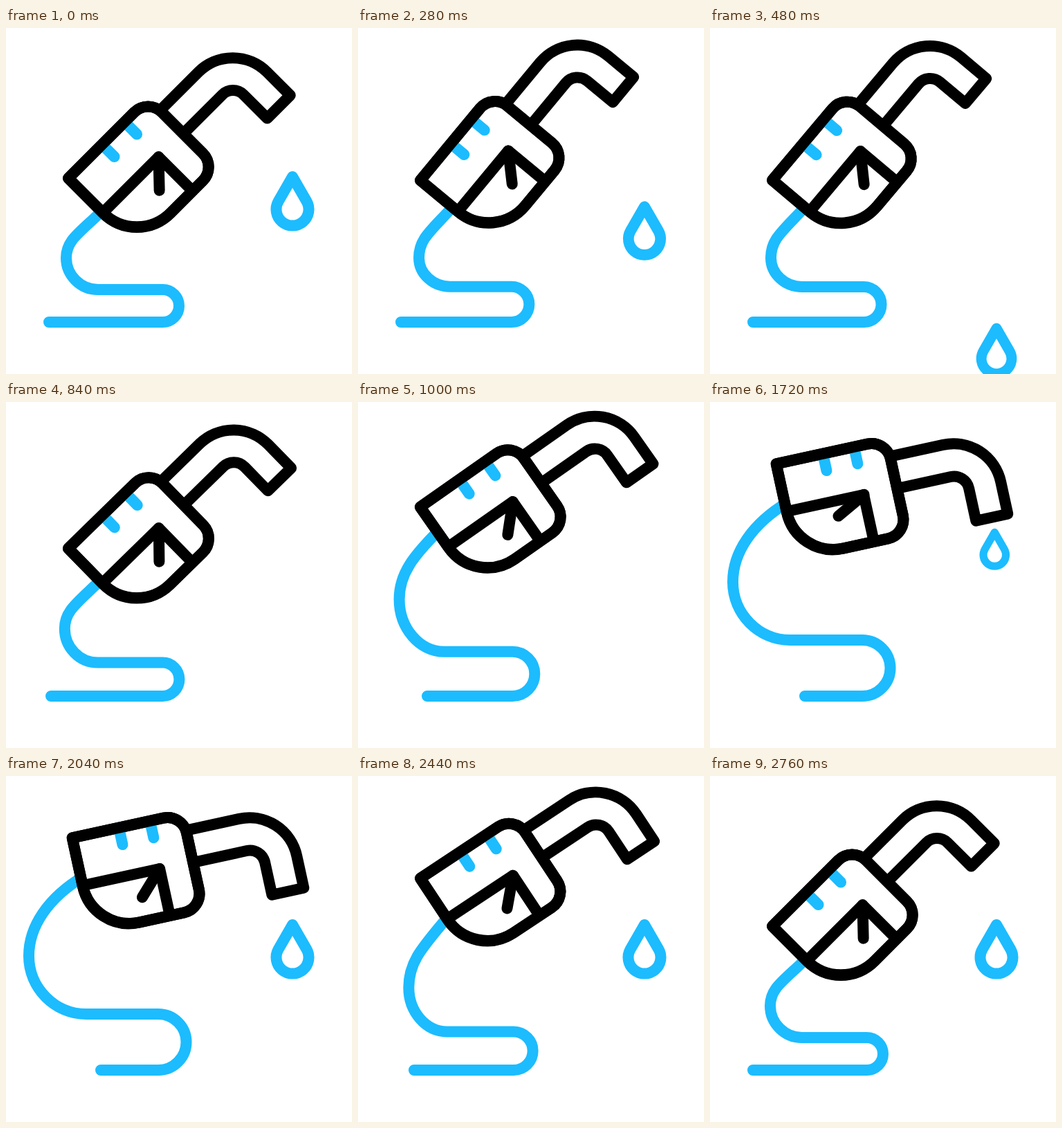
An HTML page for the animation above (3 s loop, 500x500 px).

```html
<!DOCTYPE html>
<html lang="en">
<head>
<meta charset="utf-8">
<title>Fuel nozzle</title>
<style>
  html, body { margin: 0; width: 100%; height: 100%; overflow: hidden; background: #fff; }
  svg { display: block; width: 100%; height: 100%; }
  path { fill: none; stroke: #000; stroke-width: 16; stroke-linecap: round; stroke-linejoin: round; }
  .blue { stroke: #1cbcff; }
  .solid { fill: #fff; }
</style>
</head>
<body>
<svg viewBox="0 0 500 500">
  <path id="hose" class="blue"/>
  <path id="drop" class="blue" d="M0-36 20.3-.75A23.5 23.5 0 1 1-20.3-.75Z"/>
  <!-- Nozzle axes: x runs along the barrel, y across it; the origin is the trigger pivot -->
  <g id="nozzle">
    <g transform="translate(-114.6 -72)">
      <path class="solid" d="M163 24.5H241.5A70 70 0 0 1 311.5 94.5V142H264.5V94A22 22 0 0 0 242.5 72H163"/>
      <path class="solid" stroke="none" d="M0 0H135A28 28 0 0 1 163 28V112A28 28 0 0 1 135 140H68A68 68 0 0 1 0 72Z"/>
      <path class="blue" d="M69 0V25M115 0V25"/>
      <path d="M0 0H135A28 28 0 0 1 163 28V112A28 28 0 0 1 135 140H69.5A69.5 69.5 0 0 1 0 70.5ZM0 70.5H114V140"/>
    </g>
    <path id="trigger" d="M-.6-1.5-34 33.5"/>
  </g>
</svg>
<script>
const LOOP = 3000, STEP = 40;
const [hose, drop, nozzle, trigger] =
  ['hose', 'drop', 'nozzle', 'trigger'].map(id => document.getElementById(id));

// pivot x, pivot y, angle, hose slack taken up (0..1), hose joint along the nozzle's back edge
const REST = [222, 187, -45, 0, 68];
const POUR = [223, 135.3, -12.3, 1, 58];
const KEYS = [
  [0, REST],
  [120, REST],
  [360, [217.5, 174.7, -52.2, 0, 58]],
  [680, REST],
  [800, REST],
  [1000, [225, 145, -35, .507, 43]],
  [1320, POUR],
  [2040, POUR],
  [2440, [225.3, 144.7, -33.5, .253, 68]],
  [2760, REST],
  [LOOP, REST]
];

const lerp = (a, b, u) => a + (b - a) * u;
const progress = (t, from, to) => Math.min(1, Math.max(0, (t - from) / (to - from)));

function slope(i, k) {
  const [t0, a] = KEYS[i], [t1, b] = KEYS[i + 1];
  return (b[k] - a[k]) / (t1 - t0);
}

// Monotone tangent: zero at turning points and at the ends of holds
function tangent(i, k) {
  if (i === 0 || i === KEYS.length - 1) return 0;
  const a = slope(i - 1, k), b = slope(i, k);
  return a * b > 0 ? 2 * a * b / (a + b) : 0;
}

function pose(t) {
  const i = KEYS.findIndex((key, n) => t < KEYS[n + 1][0]);
  const [t0, from] = KEYS[i], [t1, to] = KEYS[i + 1];
  const span = t1 - t0, u = (t - t0) / span, v = 1 - u;
  return from.map((a, k) =>
    a * v * v * (1 + 2 * u) + to[k] * u * u * (3 - 2 * u) +
    span * u * v * (v * tangent(i, k) - u * tangent(i + 1, k)));
}

function hosePath(x, y, angle, slack, joint) {
  const rad = angle * Math.PI / 180, cos = Math.cos(rad), sin = Math.sin(rad);
  const u = -110.6, v = joint - 72;
  const endX = x + u * cos - v * sin, endY = y + u * sin + v * cos;
  const lift = Math.max(0, -45 - angle) / 5;
  const top = 378 - 34 * slack - 4 * lift;
  const r = (425 - top) / 2;
  const capX = 226.5 - 6.5 * slack - 4.5 * lift;
  const bendX = 133 - 17 * slack;
  const leftX = 87 - 54 * slack + lift;
  const leftY = 332 - 72 * slack - 42 * slack * (1 - slack);
  return `M${62 + 75 * slack} 425H${capX}A${r} ${r} 0 0 0 ${capX} ${top}H${bendX}` +
    `C${lerp(bendX, leftX, .55)} ${top} ${leftX} ${lerp(leftY, top, .55)} ${leftX} ${leftY}` +
    `C${leftX} ${lerp(leftY, endY, .37)} ` +
    `${lerp(endX, leftX, .65)} ${lerp(endY, leftY, .49 - .22 * slack)} ${endX} ${endY}`;
}

function dropTransform(t) {
  if (t < 700) {
    const u = Math.max(0, (t - 120) / 360);
    return `translate(414 ${251 + 216.5 * u * u}) scale(${1 - .07 * u * u})`;
  }
  const u = progress(t, 1280, 2000);
  return `translate(${lerp(407, 414, u)} ${lerp(154, 251, u)}) scale(${lerp(.21, 1, u)})`;
}

function draw(t) {
  const [x, y, angle, slack, joint] = pose(t);
  const squeeze = 13 * (1 - Math.cos(2 * Math.PI * progress(t, 1300, 1920)));
  nozzle.setAttribute('transform', `translate(${x} ${y}) rotate(${angle})`);
  trigger.setAttribute('transform', `rotate(${squeeze})`);
  hose.setAttribute('d', hosePath(x, y, angle, slack, joint));
  drop.setAttribute('transform', dropTransform(t));
  drop.style.display = t >= 700 && t <= 1280 ? 'none' : '';
}

function tick() {
  draw(Math.floor(performance.now() % LOOP / STEP) * STEP);
  requestAnimationFrame(tick);
}
tick();
</script>
</body>
</html>
```
